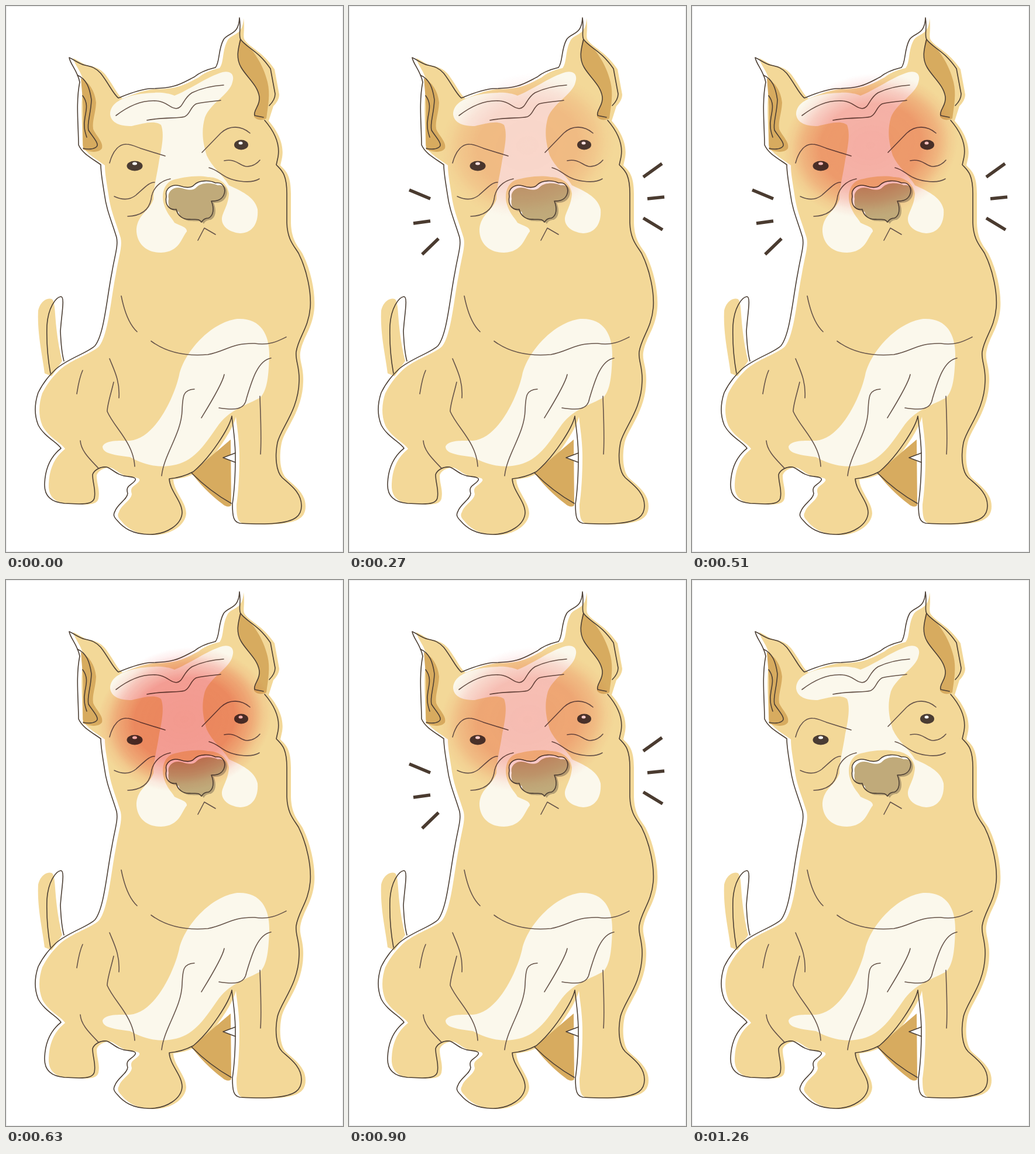
Write an HTML page that moves like this. It is 576 px wide and 932 px high and loops after 1.65 s.

```html
<!DOCTYPE html>
<html lang="en">
<head>
<meta charset="utf-8">
<title>Grumpy dog</title>
<style>
  html, body { margin: 0; width: 100%; height: 100%; overflow: hidden; background: #fff; }
  svg { display: block; width: 576px; height: 932px; }
  .coat { fill: #f3d898; }
  .dark { fill: #d7ab5f; }
  .pale { fill: #fbf8ec; }
  .eye { fill: #4a3c33; }
  .line { fill: none; stroke: #4d4035; stroke-width: 1.6; stroke-linejoin: round; stroke-linecap: round; }
  .thin { stroke: #66544a; }
  .ticks { fill: none; stroke: #4a3b30; stroke-width: 5.5; animation: blink 1650ms step-end infinite; }
  .glow { opacity: 0; mix-blend-mode: multiply; animation: flush 1650ms steps(20, end) infinite; }

  /* 60 ms rest, 600 ms up, 600 ms down, rest */
  @keyframes flush {
    0%, 3.6364% { opacity: 0; }
    40% { opacity: 1; }
    76.3636%, 100% { opacity: 0; }
  }
  /* five flashes, 120 ms off and 120 ms on */
  @keyframes blink {
    0%, 18.1818%, 32.7273%, 47.2727%, 61.8182%, 76.3636%, 100% { visibility: hidden; }
    10.9091%, 25.4545%, 40%, 54.5454%, 69.0909% { visibility: visible; }
  }
</style>
</head>
<body>
<svg viewBox="0 0 576 932">
  <defs>
    <path id="body" d="M442 195C455 210 471 235 464 262L462 271C470 280 480 285 480 320V370C481 400 493 410 500 422C515 452 522 490 520 515C517 550 500 565 496 590C494 605 502 615 501 640C500 690 470 720 464 745C459 770 462 795 472 805C485 817 505 830 505 853C505 870 495 880 460 883C440 885 420 884 400 883C389 881 387 872 387 850C390 830 392 800 392 770C392 740 388 720 386 700C382 720 350 770 320 795C305 803 290 806 279 807C280 828 301 845 301 865C300 885 275 902 246 902C215 902 200 890 190 878C184 872 183 868 186 863C190 850 207 843 208 832C204 820 212 819 219 812C226 805 216 804 208 803C190 802 182 790 172 787C160 786 150 793 148 800C148 815 154 825 151 840C149 848 140 850 125 850L100 849C75 847 65 835 66 815C67 790 75 770 94 755C88 745 65 735 55 715C47 695 50 675 55 660C65 640 75 630 85 620C105 602 140 592 152 580C168 560 172 500 181 455C186 425 192 410 189 395C180 365 172 350 168 320C165 300 162 285 162 271C150 262 130 252 124 237C124 205 119 165 126 130C122 110 110 100 108 88C117 92 125 99 135 101C146 103 154 106 162 115C176 133 183 150 192 157C205 152 225 143 246 141C290 141 300 132 322 121C335 110 350 107 358 105C366 95 362 75 372 57C380 45 398 50 399 20C402 40 397 50 401 57C412 72 430 75 452 107L460 150C460 158 455 165 450 170"/>
    <path id="nose" d="M274 325C271 312 283 303 297 307C306 310 316 312 322 305C330 297 348 297 358 302C371 300 377 312 372 323C367 333 357 333 351 333C356 345 355 358 346 362C340 362 337 364 334 369C330 362 324 365 314 364C302 365 293 357 291 347C280 349 271 340 274 325Z"/>
    <clipPath id="inNose"><use href="#nose"/></clipPath>
    <radialGradient id="red">
      <stop offset="0" stop-color="#f25f5a" stop-opacity=".64"/>
      <stop offset=".58" stop-color="#f25f5a" stop-opacity=".61"/>
      <stop offset=".78" stop-color="#f25f5a" stop-opacity=".35"/>
      <stop offset=".9" stop-color="#f25f5a" stop-opacity=".11"/>
      <stop offset="1" stop-color="#f25f5a" stop-opacity="0"/>
    </radialGradient>
  </defs>

  <!-- coat, printed slightly off its outline -->
  <path class="coat" d="M66 627C63 600 53 560 55 520C58 505 70 497 78 500C87 505 80 540 96 606L78 632Z"/>
  <use class="coat" href="#body" x="7" y="1"/>
  <path class="dark" d="M317 797L384 740L385 852C383 856 375 855 370 850C350 835 330 815 317 797Z"/>
  <path class="dark" d="M128 123C142 130 152 145 154 165C153 185 147 195 149 210C154 222 167 232 164 243C158 251 145 250 132 245C130 220 133 190 131 160Z"/>
  <path class="dark" d="M399 57C420 68 440 100 447 130C452 150 448 170 445 192C437 196 428 195 424 189C424 179 436 167 432 150C428 136 412 122 402 105C394 90 397 72 399 57Z"/>

  <path class="pale" d="M178 185C178 165 200 155 230 150C260 146 275 148 288 153C310 145 345 120 370 113C385 110 391 118 387 130C383 150 350 165 340 190C333 215 337 235 343 255C352 275 372 290 381 306C400 315 425 325 430 347C432 372 420 388 400 388C380 386 368 375 369 362C371 350 380 340 381 320C378 300 360 292 345 292C325 288 300 293 285 297C270 303 266 320 269 335C274 355 284 362 288 370C300 376 310 378 309 385C300 395 297 420 265 421C235 421 222 400 223 380C226 355 245 350 252 330C252 310 258 290 262 262C268 235 270 215 265 203C255 195 235 200 215 205C195 205 180 200 178 185Z"/>
  <path class="pale" d="M165 752C170 740 195 742 212 742C256 738 288 666 296 630C305 590 350 540 395 534C435 532 450 560 450 595C449 630 447 655 435 668C415 680 385 687 364 714C340 748 322 778 285 784C260 789 235 783 212 770C190 767 165 765 165 752Z"/>

  <use href="#nose" x="4" y="3" fill="#b5a074"/>
  <use href="#nose" fill="#fff"/>
  <g clip-path="url(#inNose)"><use href="#nose" x="4" y="4" fill="#c0aa7a"/></g>

  <ellipse class="eye" cx="220" cy="273" rx="13.5" ry="8.5"/>
  <ellipse cx="220" cy="269" rx="4" ry="2.5" fill="#fff"/>
  <ellipse class="eye" cx="402" cy="237" rx="12" ry="8.5"/>
  <ellipse cx="401" cy="234" rx="3.5" ry="2.5" fill="#fff"/>

  <path d="M392 763L371 771L392 779Z" fill="#fff"/>
  <g class="line">
    <use href="#body"/>
    <use href="#nose"/>
    <path d="M76 627C71 600 69 575 70 545C72 515 85 497 94 496C101 497 95 525 93 555C94 580 96 595 99 606"/>
    <path d="M317 797C335 815 360 835 385 849M392 763L371 771L392 779"/>
    <path d="M122 118C138 125 143 140 146 160C145 185 138 200 141 212C147 222 160 235 155 240C150 245 140 245 132 243M131 153C140 165 138 175 135 190C132 205 135 215 138 224"/>
    <path d="M401 57C396 75 393 90 402 105C412 122 430 135 433 155C435 170 422 178 425 187L440 190"/>
  </g>
  <g class="line thin">
    <path d="M188 187C210 170 235 160 258 162C275 163 280 175 291 175C303 174 302 158 318 148C335 140 355 136 372 135M241 195C265 190 295 192 305 189C315 185 315 172 325 167C340 163 355 163 367 161"/>
    <path d="M177 268C183 245 195 235 206 236C214 236 222 240 230 243L272 256M335 250L367 217C382 203 402 204 417 217"/>
    <path d="M373 264C395 260 400 274 412 274C422 274 430 268 434 263M347 276C365 280 370 295 400 299C415 301 425 300 433 295"/>
    <path d="M185 325C200 332 212 331 222 323C235 312 245 300 254 301M208 359C235 358 245 345 248 330C250 310 265 298 281 295"/>
    <path d="M328 400L339 379L358 390"/>
    <path d="M197 495C203 525 212 545 224 556M248 572C275 592 310 598 345 595C375 590 385 575 425 576C450 580 465 572 479 565"/>
    <path d="M131 622C125 635 123 650 121 662M177 602C185 622 195 640 193 669M184 642C180 660 173 680 173 692C185 720 218 745 220 786M127 742C128 760 145 775 158 789"/>
    <path d="M322 654C303 655 302 665 301 690C300 730 270 765 266 802M373 629C370 645 345 685 334 703M364 686C390 690 408 690 411 670C420 640 430 605 453 601M434 666C435 700 437 735 435 765"/>
  </g>

  <ellipse class="glow" cx="305" cy="238" rx="150" ry="122" transform="rotate(-11 305 238)" fill="url(#red)"/>
  <path class="ticks" d="M103 314L139 329M110 371L139 367M125 424L153 397M503 292L535 269M510 329L539 326M503 362L536 382"/>
  <rect x=".5" y=".5" width="575" height="931" fill="none" stroke="#e6e6e6"/>
</svg>
</body>
</html>
```
